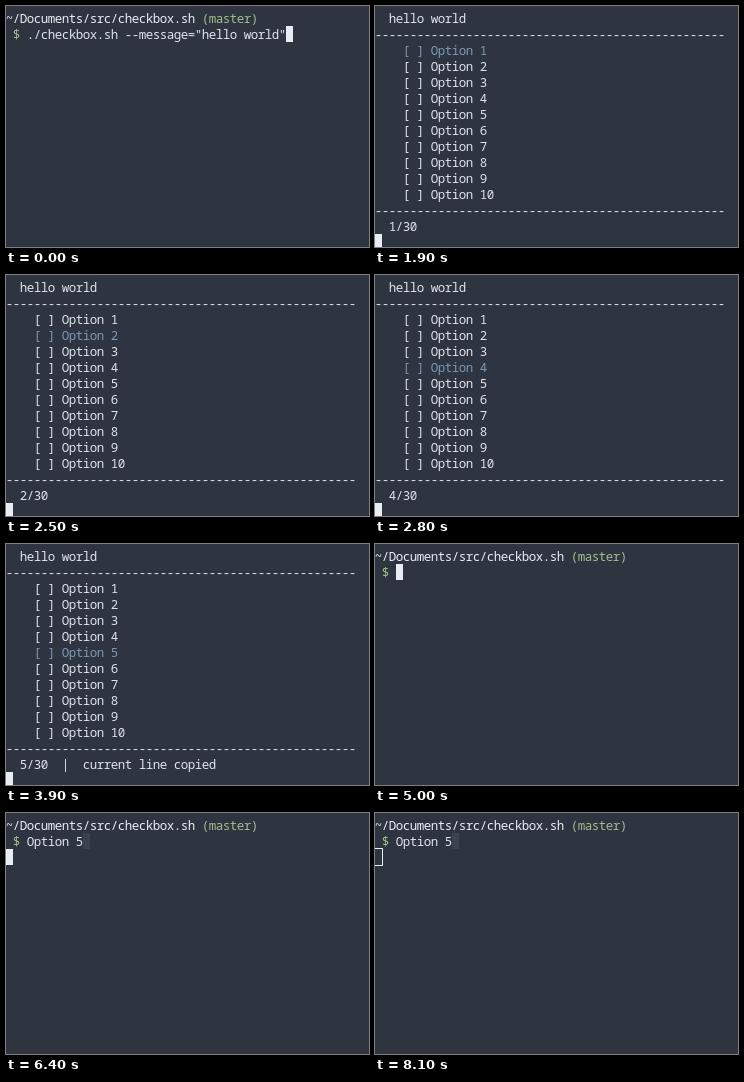
An HTML page with a canvas for the animation above (8200 ms loop, 363 px wide and 241 px high).

```html
<!DOCTYPE html>
<html lang="en">
<head>
<meta charset="utf-8">
<title>Checkbox terminal</title>
<style>
html, body { margin: 0; width: 100%; height: 100%; overflow: hidden; background: #2e3440; }
canvas { display: block; }
</style>
</head>
<body>
<canvas id="stage" width="363" height="241"></canvas>
<script>
const ctx = document.getElementById('stage').getContext('2d');
const LOOP = 8200, CELL = 7, LINE = 16, TOP = 4, BASELINE = 13;
const BG = '#2e3440', TEXT = '#dfe4ec', BRIGHT = '#e9edf3';
const GREEN = '#a3be8c', BLUE = '#7b98b6', GHOST = '#3b4350';
const RULE = '-'.repeat(50);
// When the selection moves down to options 2, 3, 4 and 5.
const MOVES = [2500, 2600, 2800, 3100];

const rowY = row => TOP + row * LINE;

// Terminal text: every character sits in its own cell.
function write(col, row, text, color = TEXT) {
  ctx.fillStyle = color;
  [...text].forEach((char, i) =>
    ctx.fillText(char, (col + i + 0.5) * CELL, rowY(row) + BASELINE));
}

function block(col, row, color = BRIGHT) {
  ctx.fillStyle = color;
  ctx.fillRect(col * CELL, rowY(row), CELL, LINE);
}

function hollowCursor(col, row) {
  ctx.strokeStyle = BRIGHT;
  ctx.lineWidth = 1;
  ctx.strokeRect(col * CELL - 0.5, rowY(row) - 0.5, CELL + 1, LINE + 1);
}

function prompt(command) {
  write(0, 0, '~/Documents/src/checkbox.sh', BRIGHT);
  write(28, 0, '(master)', GREEN);
  write(1, 1, '$', GREEN);
  write(3, 1, command);
}

function menu(t) {
  const selected = 1 + MOVES.filter(time => t >= time).length;
  write(2, 0, 'hello world');
  write(0, 1, RULE);
  for (let n = 1; n <= 10; n++) {
    write(4, n + 1, `[ ] Option ${n}`, n === selected ? BLUE : TEXT);
  }
  write(0, 12, RULE);
  write(2, 13, `${selected}/30${t >= 3900 ? '  |  current line copied' : ''}`);
  block(0, 14);
}

function draw(t) {
  ctx.fillStyle = BG;
  ctx.fillRect(0, 0, 363, 241);
  ctx.font = '12.5px "Noto Sans Mono", "DejaVu Sans Mono", monospace';
  ctx.textAlign = 'center';
  ctx.textBaseline = 'alphabetic';

  if (t < 1900) {
    prompt('./checkbox.sh --message="hello world"');
    block(40, 1);
  } else if (t < 5000) {
    menu(t);
  } else if (t < 6400) {
    prompt('');
    block(3, 1);
  } else {
    prompt('Option 5');
    block(11, 1, GHOST);
    if (t < 8100) block(0, 2);
    else hollowCursor(0, 2);
  }
}

const start = performance.now();
function tick() {
  draw((performance.now() - start) % LOOP);
  requestAnimationFrame(tick);
}
tick();
</script>
</body>
</html>
```
